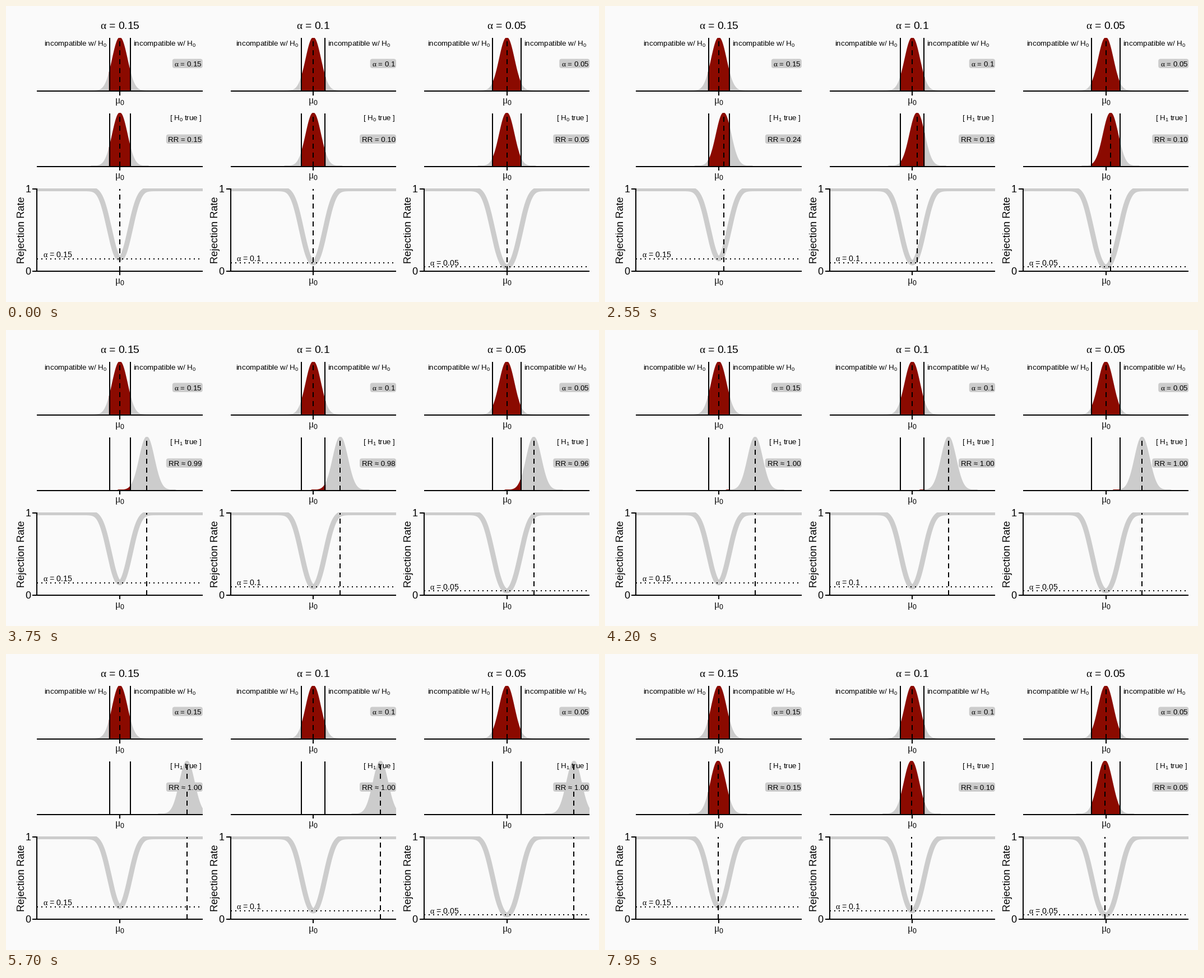
A matplotlib script that plays this animation: 1058 by 529 pixels, repeating every 8000 ms.

```python
import math

import matplotlib.pyplot as plt
import numpy as np
from matplotlib.animation import FuncAnimation
from matplotlib.patches import FancyBboxPatch, Rectangle

plt.rcParams.update({
    "font.family": "Liberation Sans",
    "mathtext.fontset": "custom",
    "mathtext.rm": "Liberation Sans",
    "mathtext.it": "Liberation Sans",
    "mathtext.cal": "Liberation Serif",
})

W, H, DPI = 1058, 529, 64
PT = 72 / DPI                       # points per pixel
BACK, GREY, RED = "#fafafa", "#cccccc", "#8b0a00"
SD = 12.8                           # standard deviation in pixels
HALF = 147.7                        # half the panel width
TOP, MID = 152, 286.5               # baselines of the two density rows
PEAK = 95
Y0, Y1 = 473.7, 326.5               # rejection rates 0 and 1
ALPHAS = [("0.15", 1.43953), ("0.1", 1.64485), ("0.05", 1.95996)]
ALPHA = r"$\mathcal{\alpha}$ = "
MU = r"$\mathcal{\mu}_0$"

CYCLE, HOLD = 130, 20               # frames per sweep, frames at rest
SLOW, FAST = 0.0118, 0.1437         # sweep speed in SDs per frame
RAMP, RAMP_LEN = 21.394, 20         # where the sweep picks up speed

fig = plt.figure(figsize=(W / DPI, H / DPI), dpi=DPI, facecolor=BACK)
ax = fig.add_axes([0, 0, 1, 1])
ax.set(xlim=(0, W), ylim=(H, 0))
ax.axis("off")


def text(x, y, s, px, ha="center", va="baseline", **kw):
    return ax.text(x, y, s, fontsize=px * PT, ha=ha, va=va, color="black",
                   zorder=6, **kw)


def line(xs, ys, **kw):
    return ax.plot(xs, ys, color="black", lw=2 * PT, zorder=4,
                   solid_capstyle="butt", dash_capstyle="butt", **kw)[0]


def dashed(x, base, top):
    return line([x, x], [base, top], ls=(0, (4.5, 3.5)))


def tag(right, y, width):
    ax.add_patch(FancyBboxPatch(
        (right - width, y), width, 16.5, fc=GREY, ec="none", zorder=5,
        boxstyle="round,pad=0,rounding_size=4"))


def phi(x):
    return 0.5 * (1 + math.erf(x / math.sqrt(2)))


def power(shift, z):
    return phi(shift - z) + phi(-shift - z)


def bell(mean, lo, hi, base):
    """Outline of the density between lo and hi."""
    lo, hi = max(lo, mean - 4 * SD), min(hi, mean + 4 * SD)
    if lo >= hi:
        return np.full((3, 2), [mean, base])
    x = np.linspace(lo, hi, 120)
    y = base - PEAK * np.exp(-0.5 * ((x - mean) / SD) ** 2)
    return np.column_stack([np.r_[lo, x, hi], np.r_[base, y, base]])


class Column:
    def __init__(self, mid, alpha, z):
        self.mid, self.z = mid, z
        self.left, self.right = mid - HALF, mid + HALF
        self.cuts = mid - z * SD, mid + z * SD

        text(mid, 41.3, ALPHA + alpha, 19.2)
        note = r"incompatible w/ $\mathrm{H}_0$"
        text(self.cuts[0] - 4.3, 70.5, note, 13.35, ha="right")
        text(self.cuts[1] + 5, 70.5, note, 13.35, ha="left")

        grey, red = self.density(TOP)
        self.place(grey, red, mid, TOP)
        dashed(mid, TOP, TOP - PEAK)
        tag(self.right, 94.5, 54 if len(alpha) > 3 else 46.3)
        text(self.right - 1.2, 108, ALPHA + alpha, 13.3, ha="right")

        self.grey, self.red = self.density(MID)
        self.mean_mid = dashed(mid, MID, MID - PEAK)
        self.truth = text(self.right - 1.5, 204, "", 13.3, ha="right")
        tag(self.right, 229.5, 65)
        self.rate = text(self.right - 1.2, 242.7, "", 13.3, ha="right")

        self.power_panel(alpha)

    def clip(self, artist, top, base):
        artist.set_clip_path(Rectangle(
            (self.left, top), self.right - self.left, base - top,
            transform=ax.transData))

    def density(self, base):
        for x in self.cuts:
            line([x, x], [base, base - PEAK])
        self.axis(base)
        return self.shape(GREY, 1, base), self.shape(RED, 2, base)

    def shape(self, color, z, base):
        patch = ax.fill([0, 0, 0], [0, 0, 0], fc=color, ec=color, lw=2 * PT,
                        zorder=z)[0]
        self.clip(patch, base - PEAK - 0.5, base)
        return patch

    def axis(self, base):
        line([self.left, self.right], [base, base])
        line([self.mid, self.mid], [base, base + 7.5])
        text(self.mid, base + 22, MU, 17.5)

    def power_panel(self, alpha):
        left, right = self.left, self.right
        xs = np.linspace(left, right, 400)
        rates = [power((x - self.mid) / SD, self.z) for x in xs]
        curve, = ax.plot(xs, Y0 + (Y1 - Y0) * np.array(rates), color=GREY,
                         lw=9 * PT, zorder=1)
        self.clip(curve, Y1 - 0.5, Y0 + 0.5)

        self.axis(Y0)
        line([left, left], [Y0 + 1, Y1 - 1])
        for y, label in ((Y0, "0"), (Y1, "1")):
            line([left - 8, left], [y, y])
            text(left - 11, y + 6.4, label, 18, ha="right")
        text(left - 27, 400.5, "Rejection Rate", 18.2, va="center", rotation=90)

        y = Y0 + (Y1 - Y0) * float(alpha)
        line([left, right], [y, y], ls=(0, (1, 3)))
        text(left + 10.5, y - 2.8, ALPHA + alpha, 14.1, ha="left")
        self.mean_low = dashed(self.mid, Y0, Y1)

    def place(self, grey, red, mean, base):
        grey.set_xy(bell(mean, self.left, self.right, base))
        red.set_xy(bell(mean, *self.cuts, base))

    def update(self, shift, null):
        mean = self.mid + shift * SD
        self.place(self.grey, self.red, mean, MID)
        for mark in (self.mean_mid, self.mean_low):
            mark.set_xdata([mean, mean])
        sub, sign = ("0", "=") if null else ("1", "\u2248")
        self.truth.set_text(rf"[ $\mathrm{{H}}_{sub}$ true ]")
        self.rate.set_text(f"RR {sign} {power(shift, self.z):.2f}")


columns = [Column(203.1 + 345.2 * i, *a) for i, a in enumerate(ALPHAS)]


def travel(k):
    """Distance of the true mean from the null, slow at first, then steady."""
    u = min(max(k - RAMP, 0), RAMP_LEN)
    eased = u * u / (2 * RAMP_LEN) + max(k - RAMP - RAMP_LEN, 0)
    return SLOW * k + (FAST - SLOW) * eased


def update(i):
    sweep, k = divmod(i, CYCLE)
    k = max(k - HOLD, 0)
    side = -1 if sweep % 2 else 1
    for col in columns:
        col.update(side * travel(k), k == 0)
    return []


anim = FuncAnimation(fig, update, frames=160, interval=50, repeat=True,
                     repeat_delay=0, blit=False)
plt.show()
```
